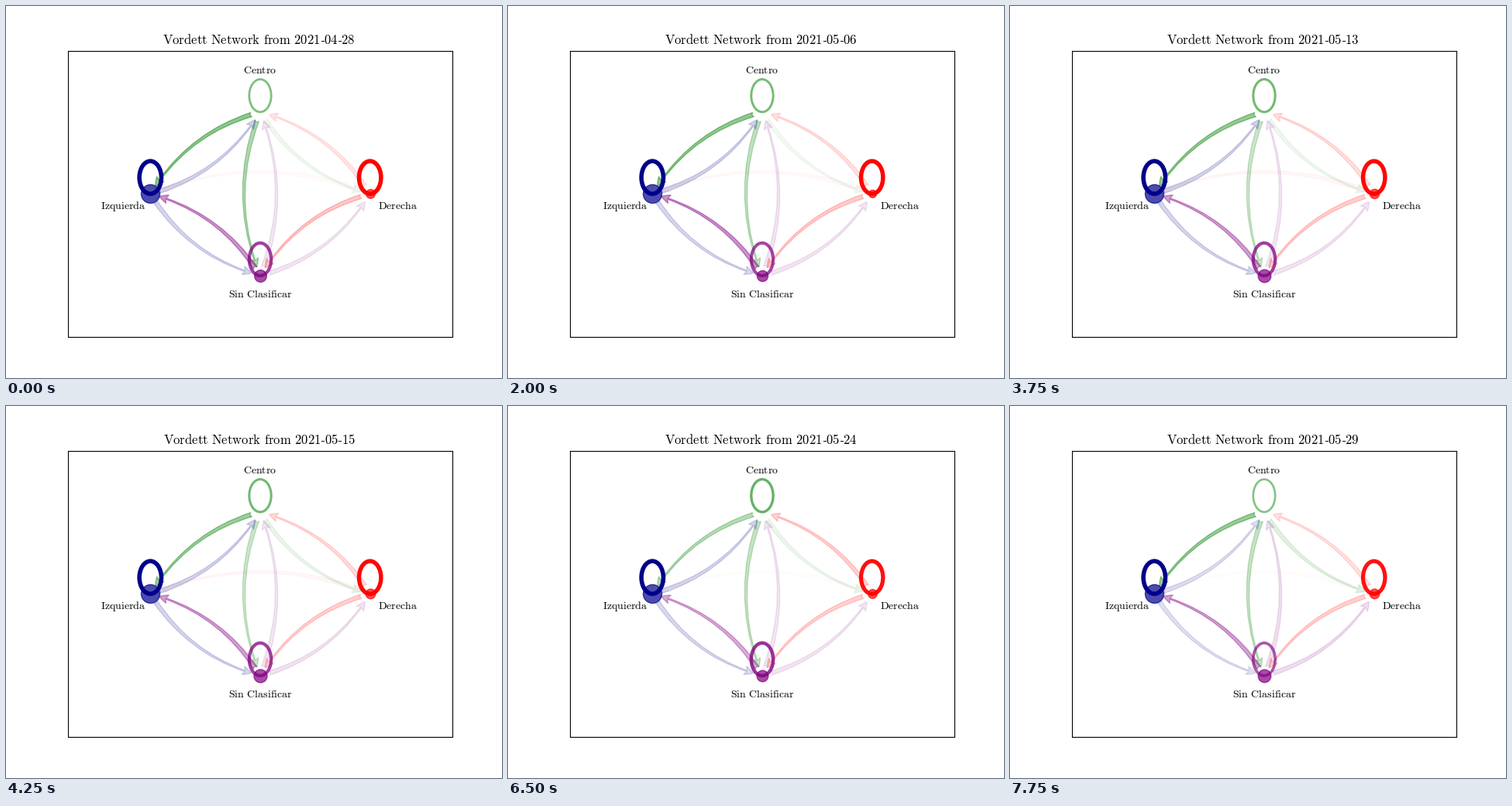
A matplotlib script that plays this animation: 640x480 px, repeating every 8 s.

```python
import matplotlib.pyplot as plt
import numpy as np
from matplotlib.animation import FuncAnimation
from matplotlib.patches import Ellipse, FancyArrowPatch, Rectangle

plt.rcParams["mathtext.fontset"] = "cm"
plt.rcParams["mathtext.default"] = "rm"

DAYS = 32
SPACE = r"\hspace{0.38}"
NODES = {"C": (0, 1), "I": (-1, 0), "D": (1, 0), "S": (0, -1)}
COLORS = {"C": "green", "I": "darkblue", "D": "red", "S": "purple"}
LABELS = [
    ("Centro", 0, 1.467),
    ("Izquierda", -1.25, -0.183),
    ("Derecha", 1.25, -0.183),
    ("Sin Clasificar", 0, -1.263),
]

# Days on which the values below are given; the days between are interpolated
KEY_DAYS = [0, 5, 12, 17, 21, 26, 31]
EDGES = {
    "CI": [.44, .42, .44, .39, .30, .28, .40],
    "CS": [.31, .27, .20, .20, .31, .22, .22],
    "CD": [.06, .05, .04, .08, .05, .07, .11],
    "IC": [.17, .17, .17, .17, .14, .16, .13],
    "IS": [.16, .16, .15, .16, .21, .15, .12],
    "SI": [.41, .44, .39, .37, .30, .32, .36],
    "SC": [.10, .11, .10, .10, .11, .10, .12],
    "SD": [.10, .10, .10, .11, .10, .10, .13],
    "DS": [.22, .20, .20, .18, .20, .18, .18],
    "DC": [.10, .13, .11, .14, .19, .18, .12],
    "DI": [.02, .012, .035, .03, .012, .012, .012],
}
LOOPS = {
    "C": [.50, .52, .55, .55, .56, .60, .48],
    "I": [1, 1, 1, 1, 1, 1, 1],
    "D": [1, 1, .97, .98, .95, .94, .93],
    "S": [.75, .70, .76, .75, .80, .80, .66],
}
RADII = {
    "I": [12, 12, 12, 12, 12, 12, 12],
    "D": [5.8, 4.3, 5.8, 6.3, 5.5, 5.8, 6.3],
    "S": [7.8, 6.3, 8, 8.5, 8.8, 7.3, 8.3],
}


def value(series, day):
    return float(np.interp(day, KEY_DAYS, series))


def roman(text):
    return "$" + text.replace(" ", SPACE) + "$"


def title_text(day):
    month, date = (4, 28 + day) if day < 3 else (5, day - 2)
    # The gaps inside the date hold the hyphens drawn below
    return roman(f"Vordett Network from 2021 {month:02d} {date:02d}")


fig, ax = plt.subplots(figsize=(6.4, 4.8), dpi=100)
ax.set(xlim=(-1.75, 1.75), ylim=(-1.75, 1.75), xticks=[], yticks=[])

title = fig.text(451 / 640, 430.7 / 480, title_text(0), size=12,
                 ha="right", va="baseline")
for x in (406.7, 429.0):
    fig.add_artist(Rectangle((x, 433.8), 4.4, 1.1, color="black", lw=0,
                             transform=None))
for text, x, y in LABELS:
    ax.text(x, y, roman(text), size=10, ha="center", va="baseline")

arrows = {}
for key in EDGES:
    start, end = key
    arrows[key] = ax.add_patch(FancyArrowPatch(
        NODES[start], NODES[end],
        arrowstyle="fancy,head_length=0.8,head_width=0.8,tail_width=0.4",
        connectionstyle="arc3,rad=0.2", mutation_scale=10,
        shrinkA=8.66, shrinkB=8.66, color=COLORS[start], lw=1, zorder=1))

loops = {}
for key in LOOPS:
    x, y = NODES[key]
    loops[key] = ax.add_patch(Ellipse((x, y + 0.2), 0.2, 0.4, fill=False,
                                      ec=COLORS[key], zorder=1.5))

dots = {}
for key in RADII:
    x, y = NODES[key]
    dots[key], = ax.plot(x, y, "o", color=COLORS[key], alpha=0.7,
                         mew=1, zorder=2)


def update(day):
    title.set_text(title_text(day))
    for key, arrow in arrows.items():
        arrow.set_alpha(value(EDGES[key], day))
    for key, loop in loops.items():
        weight = value(LOOPS[key], day)
        loop.set_alpha(weight)
        loop.set_linewidth(4 * weight)
    for key, dot in dots.items():
        dot.set_markersize(2 * value(RADII[key], day) * 0.72)
    return []


anim = FuncAnimation(fig, update, frames=DAYS, interval=250, repeat=True,
                     repeat_delay=0, blit=False)
plt.show()
```
